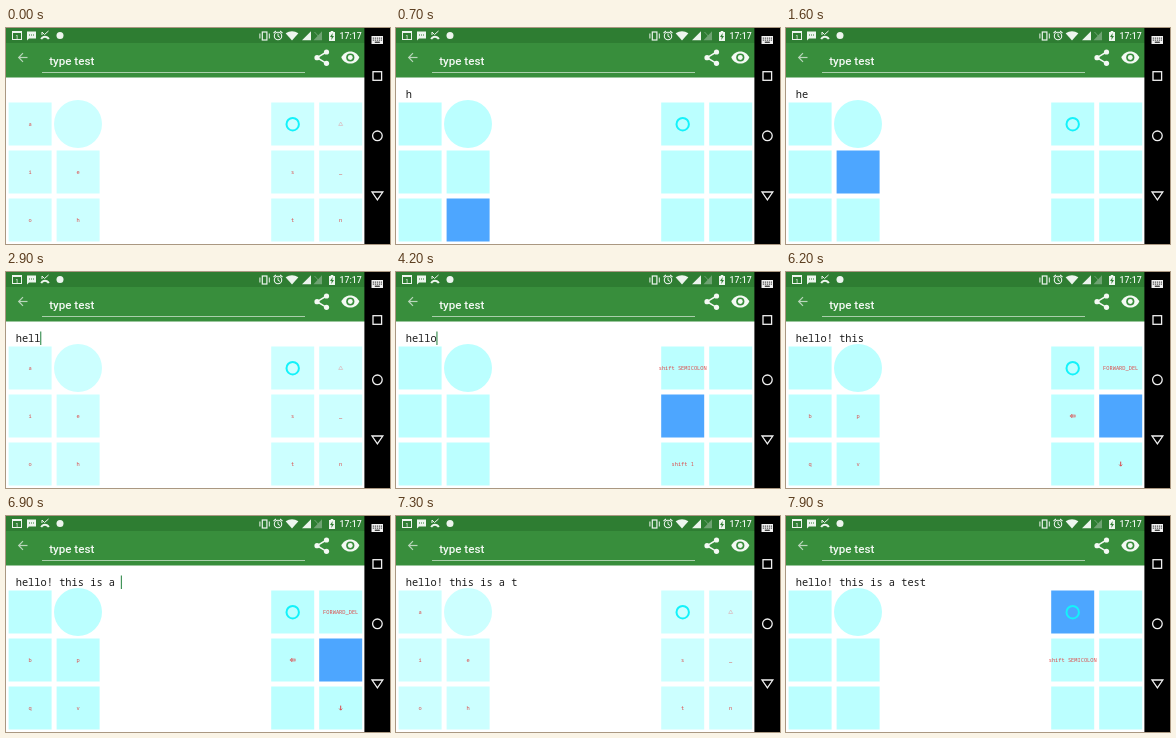
Write an HTML page with a canvas that moves like this. It is 384 by 216 pixels and loops after 8000 ms.

```html
<!DOCTYPE html>
<html lang="en">
<head>
<meta charset="utf-8">
<title>Chorded keyboard</title>
<style>
html, body { margin: 0; width: 100%; height: 100%; overflow: hidden; background: #fff; }
canvas { display: block; width: 384px; height: 216px; }
</style>
</head>
<body>
<canvas id="stage"></canvas>
<script>
const LOOP = 8000, W = 384, H = 216;
const canvas = document.getElementById('stage');
const ratio = window.devicePixelRatio || 1;
canvas.width = W * ratio;
canvas.height = H * ratio;
const ctx = canvas.getContext('2d');
ctx.scale(ratio, ratio);

const MONO = '"Noto Sans Mono", "DejaVu Sans Mono", monospace';
const SANS = 'Roboto, sans-serif';
const COLS = [2.6, 50.6, 265.2, 313.2], ROWS = [74.5, 122.5, 170.5], SIZE = 43;

// Key name -> [column, row]
const KEYS = {
  a: [0, 0], i: [0, 1], o: [0, 2],
  pad: [1, 0], e: [1, 1], h: [1, 2],
  menu: [2, 0], s: [2, 1], t: [2, 2],
  shift: [3, 0], _: [3, 1], n: [3, 2]
};
const BASE = { a: 'a', i: 'i', o: 'o', e: 'e', h: 'h', s: 's', t: 't', shift: '⇧', _: '_', n: 'n' };
const LAYERS = {
  s: { menu: 'shift SEMICOLON', t: 'shift 1' },
  _: { i: 'b', e: 'p', o: 'q', h: 'v', shift: 'FORWARD_DEL', s: '⇦', n: '↓' },
  menu: { s: 'shift SEMICOLON' }
};

// [down, up, held keys, typed text]
const STROKES = [
  [400, 1000, 'h', 'h'], [1300, 1900, 'e', 'e'],
  [2100, 2350, 'n a', 'l'], [2780, 2880, 'n a', 'l'],
  [3450, 3750, 'o', 'o'], [4050, 4280, 's', ''], [4280, 4480, 's t', '!'],
  [4680, 4880, '_', ' '], [4980, 5150, 't', 't'], [5250, 5450, 'h', 'h'],
  [5580, 5750, 'i', 'i'], [5850, 6000, 's', 's'], [6080, 6280, '_', ' '],
  [6350, 6450, 'i', 'i'], [6480, 6590, 's', 's'], [6620, 6690, '_', ' '],
  [6720, 6810, 'a', 'a'], [6850, 7000, '_', ' '], [7080, 7250, 't', 't'],
  [7360, 7450, 'e', 'e'], [7480, 7660, 's', 's'], [7690, 7800, 't', 't'],
  [7850, 8000, 'menu', '']
];
const CURSOR_ON = [
  [100, 600], [1200, 1500], [2050, 2300], [2580, 3180], [3680, 4300],
  [4700, 5200], [5600, 6100], [6700, 7200], [7400, 7700]
];

function path(points, close) {
  ctx.beginPath();
  for (let k = 0; k < points.length; k += 2) ctx.lineTo(points[k], points[k + 1]);
  if (close) ctx.closePath();
}
function fillPath(color, ...points) {
  path(points, true);
  ctx.fillStyle = color;
  ctx.fill();
}
function strokePath(color, width, close, ...points) {
  path(points, close);
  ctx.strokeStyle = color;
  ctx.lineWidth = width;
  ctx.stroke();
}
function box(color, x, y, w, h) {
  ctx.fillStyle = color;
  ctx.fillRect(x, y, w, h);
}
function frameBox(color, width, x, y, w, h) {
  ctx.strokeStyle = color;
  ctx.lineWidth = width;
  ctx.strokeRect(x, y, w, h);
}
function disc(color, x, y, r) {
  ctx.beginPath();
  ctx.arc(x, y, r, 0, 7);
  ctx.fillStyle = color;
  ctx.fill();
}
function ring(color, x, y, r, width) {
  ctx.beginPath();
  ctx.arc(x, y, r, 0, 7);
  ctx.strokeStyle = color;
  ctx.lineWidth = width;
  ctx.stroke();
}
function write(text, x, y, font, color, align = 'left') {
  ctx.font = font;
  ctx.fillStyle = color;
  ctx.textAlign = align;
  ctx.fillText(text, x, y);
}

function drawStatusBar() {
  const ink = '#edf5ee', dim = '#6fa373', green = '#2e7d32';
  box(green, 0, 0, 359, 15);

  frameBox(ink, 1, 6.5, 3.5, 9, 8);
  box(ink, 6, 3, 10, 2);
  write('1', 11, 10.5, 'bold 5px ' + SANS, ink, 'center');

  fillPath(ink, 21, 3.5, 30, 3.5, 30, 10.5, 23, 10.5, 21, 12.5);
  for (const x of [23, 25, 27]) box(green, x, 6.5, 1, 1);

  strokePath(ink, 1, false, 36, 7, 36, 4, 38.5, 6.5, 42.5, 3);
  ctx.beginPath();
  ctx.arc(39, 13, 4.2, 3.6, 5.82);
  ctx.lineWidth = 2;
  ctx.stroke();

  disc(ink, 54, 7.5, 3.5);

  // vibrate
  frameBox(ink, 1.2, 256.3, 4, 4.6, 8);
  box(ink, 253.4, 5.5, 1, 5);
  box(ink, 262.8, 5.5, 1, 5);

  // alarm
  ring(ink, 272, 8, 3.7, 1.1);
  strokePath(ink, 1, false, 272, 5.5, 272, 8.3, 274, 9.4);
  strokePath(ink, 1.1, false, 267.5, 5, 270, 3);
  strokePath(ink, 1.1, false, 276.5, 5, 274, 3);

  // wifi
  ctx.beginPath();
  ctx.moveTo(286, 12.5);
  ctx.lineTo(279.6, 5.3);
  ctx.quadraticCurveTo(286, 1, 292.4, 5.3);
  ctx.closePath();
  ctx.fillStyle = ink;
  ctx.fill();

  // mobile signal
  fillPath(ink, 296, 12.3, 305, 12.3, 305, 3.3);
  fillPath(dim, 307.5, 12.3, 316, 12.3, 316, 3.3);
  strokePath(dim, 1, false, 308.5, 4, 316, 12);

  // battery
  box(ink, 323, 4, 6, 9);
  box(ink, 324.7, 3, 2.6, 1);
  fillPath(green, 326.7, 5, 324, 9, 325.7, 9, 325.3, 12, 328, 8, 326.3, 8);

  write('17:17', 333.6, 11, '500 8.7px ' + SANS, ink);
}

function drawAppBar() {
  const ink = '#f4f9f4';
  box('#388e3c', 0, 15, 359, 34.5);
  strokePath('#b9d6bb', 1.2, false, 21.5, 29.5, 12.8, 29.5);
  strokePath('#b9d6bb', 1.2, false, 17, 25.2, 12.7, 29.5, 17, 33.8);
  write('type test', 43.2, 37, '500 11.6px ' + SANS, ink);
  box('#a9cfab', 36, 44, 263, 1);

  strokePath(ink, 1.5, false, 320.5, 24, 311, 29.7, 320.5, 35.3);
  disc(ink, 320.5, 24, 2.6);
  disc(ink, 311, 29.7, 2.6);
  disc(ink, 320.5, 35.3, 2.6);

  // eye
  const x = 344.3, y = 29.5;
  ctx.beginPath();
  ctx.moveTo(x - 9, y);
  ctx.bezierCurveTo(x - 7.5, y - 3.6, x - 4.1, y - 6.1, x, y - 6.1);
  ctx.bezierCurveTo(x + 4.1, y - 6.1, x + 7.5, y - 3.6, x + 9, y);
  ctx.bezierCurveTo(x + 7.5, y + 3.6, x + 4.1, y + 6.1, x, y + 6.1);
  ctx.bezierCurveTo(x - 4.1, y + 6.1, x - 7.5, y + 3.6, x - 9, y);
  ctx.fillStyle = ink;
  ctx.fill();
  disc('#388e3c', x, y, 4.1);
  disc(ink, x, y, 2.45);
}

function drawNavBar() {
  const ink = '#f0f0f0';
  box('#000', 358.4, 0, 25.6, H);
  box(ink, 365.5, 8, 11.5, 8);
  for (let k = 0; k < 5; k++) {
    box('#000', 366.8 + k * 2, 9.6, 1, 1);
    box('#000', 366.8 + k * 2, 11.6, 1, 1);
  }
  box('#000', 368.8, 13.7, 5, 1);
  frameBox(ink, 1.3, 367, 43.7, 8.6, 8.6);
  ring(ink, 371.4, 107.8, 4.8, 1.3);
  strokePath(ink, 1.3, true, 366, 164, 376.8, 164, 371.4, 171.8);
}

// Arrow labels, drawn around the middle of a key
const ARROWS = {
  '⇧': (x, y) => strokePath('#dcb9bd', 0.7, true, x - 2, y + 1.5, x, y - 2, x + 2, y + 1.5),
  '⇦': (x, y) => {
    strokePath('#d9696b', 0.8, true, x - 2.8, y, x - 0.8, y - 1.7, x - 0.8, y + 1.7);
    frameBox('#d9696b', 0.8, x - 0.8, y - 0.9, 3.2, 1.8);
  },
  '↓': (x, y) => {
    strokePath('#d9494c', 1, false, x, y - 2.4, x, y + 2);
    strokePath('#d9494c', 0.9, false, x - 1.5, y + 0.6, x, y + 2.2, x + 1.5, y + 0.6);
  }
};

function drawLabel(name, label) {
  const [col, row] = KEYS[name];
  const x = COLS[col] + SIZE / 2, y = ROWS[row] + SIZE / 2;
  if (ARROWS[label]) ARROWS[label](x, y);
  else write(label, x, y + 2, '5.33px ' + MONO, '#dd4a4a', 'center');
}

function drawKeys(held) {
  const idle = held.length === 0;
  const labels = idle ? BASE : held.length === 1 && LAYERS[held[0]] || {};
  const face = idle ? '#ccffff' : '#bbffff';
  for (const [name, [col, row]] of Object.entries(KEYS)) {
    if (name === 'pad') disc(face, 72, 96, 24);
    else box(held.includes(name) ? '#4da6ff' : face, COLS[col], ROWS[row], SIZE, SIZE);
  }
  if (!labels.menu) ring('#14f2fa', 286.7, 96.2, 6.2, 2);
  for (const [name, label] of Object.entries(labels)) drawLabel(name, label);
}

function drawText(time) {
  const text = STROKES.filter(s => s[0] <= time).map(s => s[3]).join('');
  write(text, 9.7, 70, '10.35px ' + MONO, '#1c1c1c');
  if (CURSOR_ON.some(([from, to]) => time >= from && time < to)) {
    box('#43945a', 9.3 + ctx.measureText(text).width, 59.5, 1.2, 13.5);
  }
}

function draw(time) {
  const stroke = STROKES.find(s => time >= s[0] && time < s[1]);
  box('#fff', 0, 0, W, H);
  drawStatusBar();
  drawAppBar();
  drawKeys(stroke ? stroke[2].split(' ') : []);
  drawText(time);
  drawNavBar();
}

const start = performance.now();
function frame() {
  draw((performance.now() - start) % LOOP);
  requestAnimationFrame(frame);
}
frame();
</script>
</body>
</html>
```
